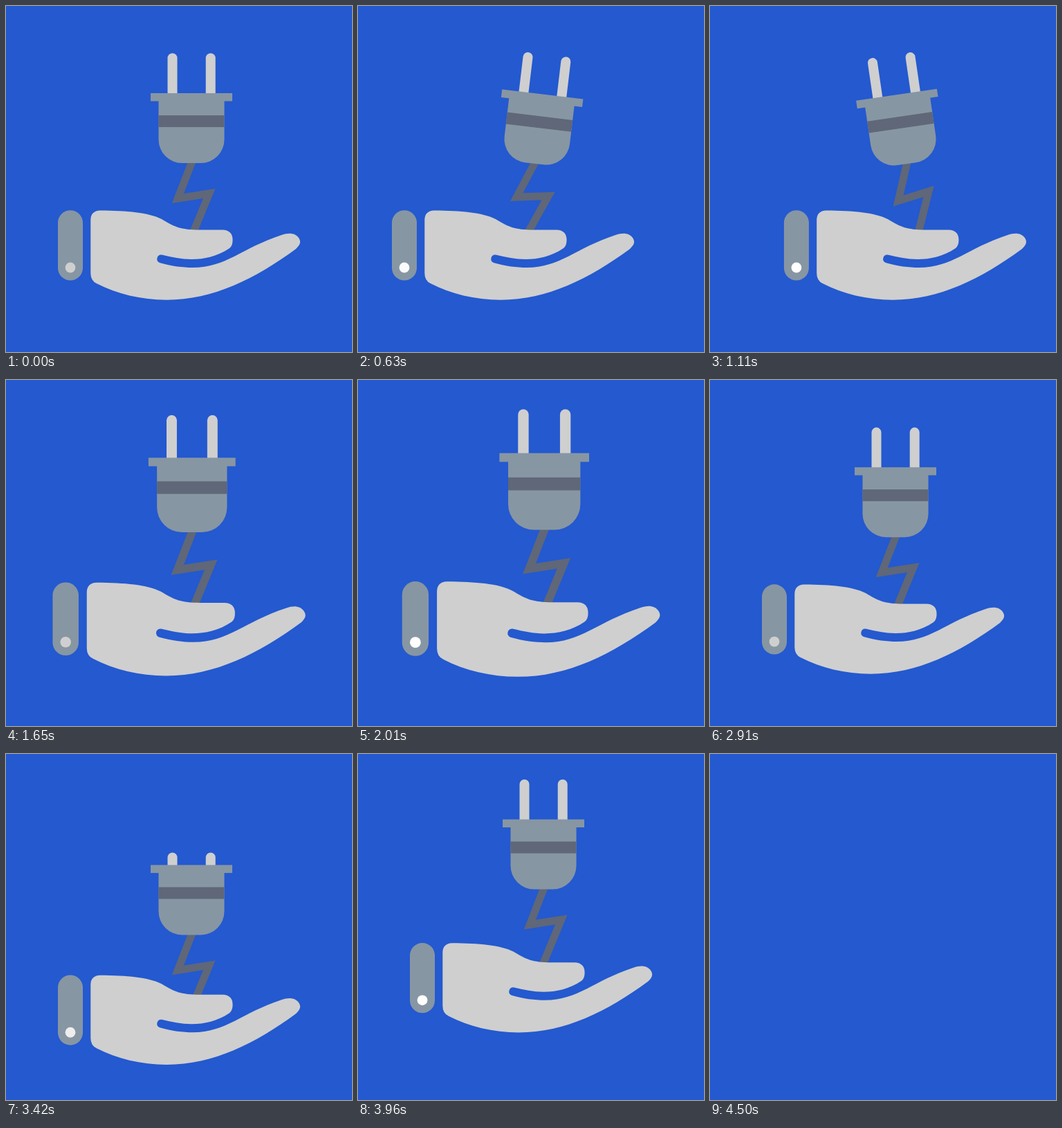
These frames come from a looping animation (500 px wide and 500 px high, 4530 ms). An HTML page:

```html
<!DOCTYPE html>
<html lang="en">
<head>
<meta charset="utf-8">
<title>Plug over hand</title>
<style>
  html, body { margin: 0; width: 100%; height: 100%; overflow: hidden; background: #2459cf; }
  svg { display: block; width: 100%; height: 100%; }
</style>
</head>
<body>
<svg viewBox="0 0 500 500">
  <g id="scene">
    <g id="plug">
      <path d="M270 222L248.3 278L293.7 271L265.3 340" fill="none" stroke="#5f6778" stroke-width="11"/>
      <g id="prongs" fill="#cfcfcf">
        <rect x="233.5" y="68.3" width="14" height="66" rx="7"/>
        <rect x="288.7" y="68.3" width="14" height="66" rx="7"/>
      </g>
      <rect x="209" y="126" width="118" height="11.5" fill="#8796a3"/>
      <path d="M220.5 130H315.5V193A34 34 0 0 1 281.5 227H254.5A34 34 0 0 1 220.5 193Z" fill="#8796a3"/>
      <rect x="220.5" y="158" width="95" height="17" fill="#5f6778"/>
    </g>
    <path fill="#cfcfcf" d="M122.3 309Q122.5 296 136 295.5C175 296 205 298 225 308C243 319 252 323.5 280 323.5
      H313Q327 324 327.5 337Q328 346 323 350C305 362 287 366 268 366C253 366 240 363 225 359.5
      A6 6 0 0 0 222 371C240 376 255 378 270 378C318 378 340 350 398 331C409 327 418 328 423 335
      C427 341 425 345 419 351C360 394 300 424.7 232 424.7C195 424.5 160 416 131 401Q122.3 397 122.3 386Z"/>
    <rect x="75" y="295.2" width="36" height="101.3" rx="18" fill="#8796a3"/>
    <circle id="dot" cx="93" cy="378" r="7.4"/>
  </g>
</svg>
<script>
const LOOP = 4530, STEP = 30, HIDE = 4500, BLINK = 693;
const [scene, plug, prongs, dot] = ['scene', 'plug', 'prongs', 'dot'].map(id => document.getElementById(id));

const clamp = v => Math.max(0, Math.min(1, v));
const ease = (t, from, to) => (1 - Math.cos(Math.PI * clamp((t - from) / (to - from)))) / 2;

// 0 -> 1 -> -1 -> 0
const swing = (t, start, high, low, end) => ease(t, start, high) - 2 * ease(t, high, low) + ease(t, low, end);
// 0 -> 1 -> 0
const pulse = (t, start, peak, end) => ease(t, start, peak) - ease(t, peak, end);

const scaleAt = (s, x, y) => `translate(${x} ${y}) scale(${s}) translate(${-x} ${-y})`;

function draw(t) {
  const sway = -35 * swing(t, 0, 510, 1025, 1466);
  const grow = .101 * swing(t, 1466, 1870, 2370, 2890);
  const bob = 24.6 * swing(t, 2890, 3395, 3850, 4390);
  const retract = 40 * (pulse(t, 2100, 2370, 2730) + pulse(t, 2890, 3395, 3870));
  const phase = t / BLINK % 1;
  const glow = clamp((phase - .5) * 10) * clamp((1 - phase) * 10);
  const shade = Math.round(207 + 48 * glow);

  scene.setAttribute('visibility', t < HIDE ? 'visible' : 'hidden');
  scene.setAttribute('transform', `translate(${sway} ${bob}) ${scaleAt(1 + grow, 250, 360)}`);
  plug.setAttribute('transform',
    `translate(0 ${bob * .42}) rotate(${-sway * .262} 268 335) ${scaleAt(1 + grow * .5, 268, 280)}`);
  prongs.setAttribute('transform', `translate(0 ${retract})`);
  dot.setAttribute('fill', `rgb(${shade},${shade},${shade})`);
}

const start = performance.now();
function frame() {
  const t = (performance.now() - start) % LOOP;
  draw(Math.floor(t / STEP) * STEP);
  requestAnimationFrame(frame);
}
frame();
</script>
</body>
</html>
```
